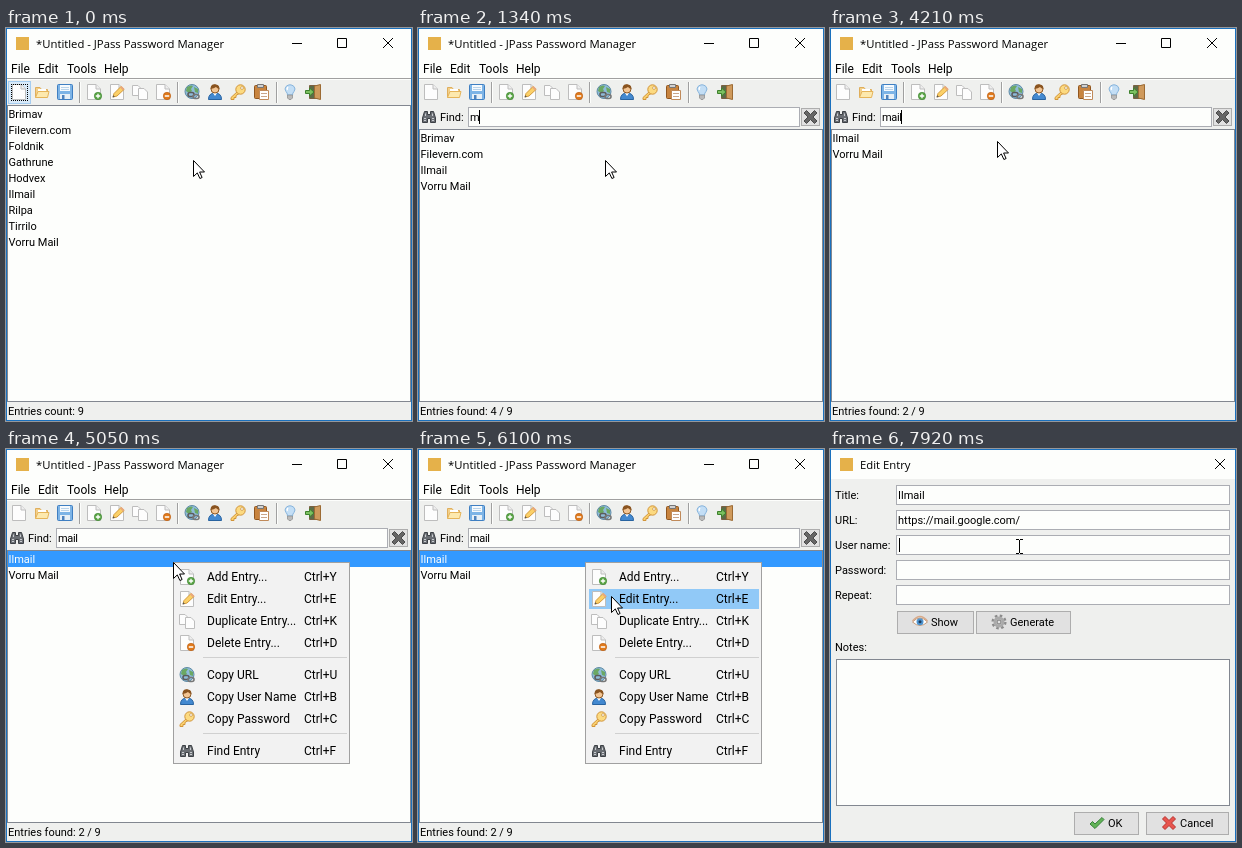
Animation of 406 by 393 pixels, one loop 8 s. Source, as an HTML page:

```html
<!DOCTYPE html>
<html lang="en">
<head>
<meta charset="utf-8">
<title>Password manager</title>
<style>
  html, body { margin: 0; width: 100%; height: 100%; overflow: hidden; background: #fdfefc; }
  svg { display: block; }
  text { font: 11px Roboto, sans-serif; white-space: pre; }
  .menu { font-size: 12px; }
  .title { font: 11.3px "Open Sans", sans-serif; }
  .tight { letter-spacing: -.35px; }
  .crisp { shape-rendering: crispEdges; }
</style>
</head>
<body>
<svg width="406" height="393" viewBox="0 0 406 393">
  <defs>
    <g id="page">
      <path d="M1.5.5H10L14.500 5V15.500H1.500Z" fill="#fdfdfd" stroke="#bdbdbd"/>
      <path d="M10 .5V5H14.500" fill="#eee" stroke="#bdbdbd"/>
    </g>
    <g id="folder">
      <path d="M1.500 13.500V3.500H6L7.500 5.500H13.500V8" fill="#f3d08a" stroke="#dfae5c"/>
      <path d="M4 5H12V9H4Z" fill="#fff"/>
      <path d="M1.500 13.500L4 7.500H15L13.500 13.500Z" fill="#fde9ae" stroke="#e5b45a"/>
    </g>
    <g id="save">
      <rect x=".5" y=".5" width="15" height="15" rx="1" fill="#7db4e6" stroke="#3f7fc2"/>
      <path d="M3 1H13V7H3Z" fill="#f6fafd"/>
      <path d="M4 3.500H12M4 5.500H12" stroke="#b9d3ea"/>
      <path d="M3 10H13V15H3Z" fill="#e8f0f6"/>
      <path d="M5 11H7.500V15H5Z" fill="#4f83bd"/>
    </g>
    <g id="add">
      <use href="#page"/>
      <circle cx="12" cy="12" r="3.700" fill="#5aa545" stroke="#3c832f" stroke-width=".6"/>
      <path d="M9.800 12H14.200M12 9.800V14.200" stroke="#fff" stroke-width="1.300"/>
    </g>
    <g id="delete">
      <use href="#page"/>
      <circle cx="12" cy="12" r="3.700" fill="#e07a1c" stroke="#b9590f" stroke-width=".6"/>
      <path d="M9.800 12H14.200" stroke="#fff" stroke-width="1.500"/>
    </g>
    <g id="edit">
      <use href="#page"/>
      <path d="M4 13L5 9.500 12 2.500 15 5.500 8 12Z" fill="#fbd068" stroke="#d39a3a"/>
      <path d="M11 3.500L12.500 2 15.500 5 14 6.500Z" fill="#e9a87c"/>
      <path d="M3.500 13.500L4.300 11.200 5.900 12.700Z" fill="#555"/>
    </g>
    <g id="copy">
      <path d="M.5 1.500H6L8.500 4V11.500H.5Z" fill="#fdfdfd" stroke="#bdbdbd"/>
      <path d="M6.500 4.500H12L15.500 8V15.500H6.500Z" fill="#fdfdfd" stroke="#bdbdbd"/>
    </g>
    <g id="globe">
      <circle cx="8" cy="7.500" r="7" fill="#8dbbd9" stroke="#5f8ba5"/>
      <path d="M3 3Q7 .5 9 2L7 5 8 7 5 9 2 7ZM10 3L14 5 14 9 11 8Z" fill="#6ba863"/>
      <g fill="none" stroke-width="1.600">
        <rect x="4" y="8.500" width="6" height="4" rx="2" stroke="#5c5c5c"/>
        <rect x="9" y="10.500" width="6" height="4" rx="2" stroke="#777"/>
      </g>
    </g>
    <g id="user">
      <path d="M1.500 15.500Q1.500 9 8 9T14.500 15.500Z" fill="#4389d0" stroke="#2863a0"/>
      <path d="M6 9L8 12 10 9Z" fill="#fff"/>
      <circle cx="8" cy="5" r="4" fill="#f3c593" stroke="#8e5a26"/>
      <path d="M3.500 5Q3.500 0 8 .3T12.500 5Q10 4.500 9 3 7 4.500 3.500 5Z" fill="#8a5420"/>
    </g>
    <g id="key">
      <path d="M8 7L1 13.500V15.500H4V13.500H6V11.500L10 9Z" fill="#fbd270" stroke="#d2953a"/>
      <circle cx="10.500" cy="5.500" r="4.700" fill="#fcda80" stroke="#d2953a"/>
      <circle cx="12" cy="4" r="1.400" fill="#fff" stroke="#b97d28" stroke-width=".6"/>
    </g>
    <g id="clipboard">
      <rect x="1.500" y="1.500" width="12" height="13" rx="1" fill="#c8843f" stroke="#90561f"/>
      <path d="M4.500.5H10.500V3.500H4.500Z" fill="#d0d0d0" stroke="#777"/>
      <path d="M6.500 6.500H15.500V15.500H6.500Z" fill="#fff" stroke="#c08a5a"/>
      <path d="M8 9.500H14M8 12.500H14" stroke="#c9a58a"/>
    </g>
    <g id="bulb">
      <path d="M5.500 11Q5.500 9 4 7.500 2 5 4 2.500 8-1 12 2.500 14 5 12 7.500 10.500 9 10.500 11Z" fill="#c3def5" stroke="#86b4dc"/>
      <path d="M6 3Q4.500 4.500 5.500 6" fill="none" stroke="#fff" stroke-width="1.500"/>
      <path d="M5.500 11H10.500V14L9 15.500H7L5.500 14Z" fill="#bbb" stroke="#888" stroke-width=".7"/>
    </g>
    <g id="exit">
      <path d="M4.500 1.500H15.500V14.500H4.500Z" fill="#5d6b48" stroke="#7a6142"/>
      <path d="M9.500 2L15.500 .5V15.500L9.500 14Z" fill="#cf9a5c" stroke="#9c6b34"/>
      <path d="M.5 6.500H4.500V4L9 8 4.500 12V9.500H.5Z" fill="#7cc061" stroke="#3d812c"/>
    </g>
    <g id="find" fill="#6a6e73" stroke="#3c4045">
      <path d="M3.500 2.500H6.500V5.500H9.500V2.500H12.500L14.500 9V13.500H9.500V9.500H6.500V13.500H1.500V9Z"/>
      <path d="M3 9.500H5M11 9.500H13M4.500 4.500V7M11.500 4.500V7M3 11.500H5M11 11.500H13" stroke="#c9ccd0"/>
    </g>
    <g id="eye">
      <path d="M.5 8Q8 0 15.500 8 8 15 .5 8Z" fill="#fff" stroke="#c49a7a"/>
      <circle cx="8" cy="7.700" r="3.500" fill="#4f95d0"/>
      <circle cx="8" cy="7.700" r="1.500" fill="#1d3a5c"/>
      <path d="M.5 7Q8-2 15.500 7" fill="none" stroke="#d7a988" stroke-width="1.300"/>
    </g>
    <g id="gear" fill="none">
      <circle cx="8" cy="8" r="6.300" stroke="#8b8b8b" stroke-width="2.500" stroke-dasharray="2.500 2.450"/>
      <circle cx="8" cy="8" r="4" fill="#eee" stroke="#aaa" stroke-width="3"/>
      <circle cx="8" cy="8" r="2" fill="#e1e1e1" stroke="#777"/>
    </g>
    <path id="check" d="M1 9L3.500 6.500 6 9 13 2.500 15 4.500 6 13.500Z" fill="#62b357" stroke="#37803a"/>
    <path id="cross" d="M1.500 4L4 1.500 8 5.500 12 1.500 14.500 4 10.500 8 14.500 12 12 14.500 8 10.500 4 14.500 1.500 12 5.500 8Z"/>
    <path id="arrow" d="M.5.500V16.500L4.300 12.900 6.900 18.500 9.100 17.500 6.600 12H11.500Z" fill="#fff" stroke="#000"/>
    <path id="beam" class="crisp" d="M-3-6.500H0M1-6.500H4M.5-6V7M-3 7.500H0M1 7.500H4" fill="none" stroke="#000"/>
  </defs>
  <g id="stage"></g>
</svg>
<script>
const LOOP = 8000, STEP = 70;
const WHITE = '#fdfefc', PANEL = '#eff0ee', EDGE = '#828790', FIELD_EDGE = '#abadb3', SHADOW = '#a0a0a0';
const entries = ['Brimav', 'Filevern.com', 'Foldnik', 'Gathrune', 'Hodvex',
                 'Ilmail', 'Rilpa', 'Tirrilo', 'Vorru Mail'];
const queries = [[2460, 'mail'], [1830, 'mai'], [1620, 'ma'], [1340, 'm'], [0, '']];
// start, end, x, y
const carets = [
  [500, 920, 53, 82], [1340, 1620, 61, 82], [1620, 1830, 67, 82], [1830, 2250, 69, 82],
  [2460, 2880, 71, 82], [3370, 3860, 71, 82], [4210, 4420, 71, 82],
  [6520, 6940, 94, 39], [7430, 7920, 94, 39], [7920, 8000, 69, 89]
];
const tools = [['page', 5], ['folder', 28], ['save', 51], ['add', 80], ['edit', 103], ['copy', 126],
  ['delete', 149], ['globe', 178], ['user', 201], ['key', 224], ['clipboard', 247], ['bulb', 276], ['exit', 299]];
const menuItems = [
  ['add', 'Add Entry...', 'Y', 128], ['edit', 'Edit Entry...', 'E', 150],
  ['copy', 'Duplicate Entry...', 'K', 172], ['delete', 'Delete Entry...', 'D', 194],
  ['globe', 'Copy URL', 'U', 226], ['user', 'Copy User Name', 'B', 248],
  ['key', 'Copy Password', 'C', 270], ['find', 'Find Entry', 'F', 302]
];

const rect = (x, y, w, h, fill) =>
  `<rect class="crisp" x="${x}" y="${y}" width="${w}" height="${h}" fill="${fill}"/>`;
const box = (x, y, w, h, fill, edge) => rect(x, y, w, h, edge) + rect(x + 1, y + 1, w - 2, h - 2, fill);
const text = (x, y, s, cls = '', fill = '#000') => `<text x="${x}" y="${y}" class="${cls}" fill="${fill}">${s}</text>`;
const line = (d, stroke = '#000', extra = '') => `<path d="${d}" fill="none" stroke="${stroke}" ${extra}/>`;
const icon = (id, x, y, extra = '') => `<use href="#${id}" x="${x}" y="${y}" ${extra}/>`;
const dotted = (x, y, w, h) => line(
  `M${x} ${y + .5}h${w}M${x} ${y + h - .5}h${w}M${x + .5} ${y}v${h}M${x + w - .5} ${y}v${h}`,
  '#000', 'class="crisp" stroke-dasharray="1 1"');
const closeMark = x => line(`M${x} 10l10 10m0-10l-10 10`);

// Stepped pointer movement, one position per STEP
function glide(t, start, steps, from, to) {
  const p = Math.max(0, Math.min(steps, Math.floor((t - start) / STEP) + 1)) / steps;
  const eased = p * p * (3 - 2 * p);
  return from.map((v, i) => Math.round(v + (to[i] - v) * eased));
}

function frame(title) {
  return box(0, 0, 406, 393, PANEL, '#1a70bd') + rect(1, 1, 404, 29, WHITE) +
    rect(10, 9, 13, 13, '#e5b14a') + text(30, 20, title, 'title');
}

function toolbar(focused) {
  const groove = (x, y, w, h, dx, dy) => rect(x, y, w, h, SHADOW) + rect(x + dx, y + dy, w, h, WHITE);
  let out = groove(1, 50, 404, 1, 0, 1);
  if (focused) out += box(2, 53, 23, 23, '#d8eaf9', '#a5cdf0');
  out += tools.map(([id, x]) => icon(id, x, 56)).join('');
  out += [73, 171, 270].map(x => groove(x, 54, 1, 21, 1, 0)).join('');
  return out + (focused ? dotted(5, 56, 17, 17) : '');
}

function searchBar(query) {
  return icon('find', 3, 81) + text(22, 93, 'Find:') +
    box(50, 79, 332, 20, WHITE, FIELD_EDGE) + text(52, 93, query, 'tight') +
    box(383, 80, 19, 18, '#e1e1e1', '#adadad') + icon('cross', 384.500, 81, 'fill="#666" stroke="#4a4a4a"');
}

function popup(hover) {
  const rows = menuItems.map(([id, label, key, y], i) =>
    (i === hover ? rect(171, y - 10, 170, 20, '#91c9f7') : '') + icon(id, 173, y - 8) +
    text(201, y + 4, label, 'menu') + text(298, y + 4, 'Ctrl+' + key, 'menu'));
  return box(167, 113, 177, 202, '#f2f2f2', SHADOW) + rows.join('') +
    [208, 284].map(y => rect(197, y, 144, 1, '#d0d0d0')).join('');
}

function mainWindow(t) {
  const searching = t >= 500, selected = t >= 4420, menuOpen = t >= 5050;
  const query = queries.find(q => t >= q[0])[1];
  const found = entries.filter(e => e.toLowerCase().includes(query));
  const top = searching ? 101 : 77;
  let out = frame('*Untitled - JPass Password Manager') +
    line('M286 15.500h10') + line('M331.500 10.500h9v9h-9Z') + closeMark(377) +
    rect(1, 30, 404, 20, WHITE) +
    [['File', 5], ['Edit', 32], ['Tools', 61], ['Help', 98]].map(([s, x]) => text(x, 45, s, 'menu')).join('') +
    toolbar(!searching) + (searching ? searchBar(query) : '') +
    box(1, top, 404, 374 - top, WHITE, EDGE);
  if (selected) out += rect(2, 102, 402, 16, '#3399ff');
  if (selected && !menuOpen) out += dotted(2, 102, 402, 16);
  out += found.map((e, i) =>
    text(2.500, top + 13 + 16 * i, e, '', selected && i === 0 ? WHITE : '#000')).join('');
  out += text(2, 387, query ? `Entries found: ${found.length} / ${entries.length}` : `Entries count: ${entries.length}`);

  let pointer = glide(t, 3650, 7, [187, 132], [167, 113]);
  if (menuOpen) {
    pointer = t >= 6100 ? [193, 147] : glide(t, 5750, 4, [167, 113], [189, 142]);
    out += popup(pointer[1] >= 139 ? 1 : pointer[1] >= 117 ? 0 : -1);
  }
  return [out, icon('arrow', ...pointer)];
}

function button(x, y, w, id, label, labelX, iconX, extra) {
  return box(x, y, w, 23, '#e1e1e1', '#adadad') + icon(id, iconX, y + 3, extra) + text(labelX, y + 15, label);
}

function dialog(t) {
  const fields = [['Title:', 'Ilmail'], ['URL:', 'https://mail.google.com/'], ['User name:', ''], ['Password:', ''], ['Repeat:', '']];
  const out = frame('Edit Entry') + closeMark(385) +
    fields.map(([label, value], i) => text(5, 50 + 25 * i, label) +
      box(66, 36 + 25 * i, 334, 20, WHITE, FIELD_EDGE) +
      text(68, 50 + 25 * i, value)).join('') +
    button(67, 162, 77, 'eye', 'Show', 101, 82) +
    button(146, 162, 95, 'gear', 'Generate', 180, 161) +
    text(5, 202, 'Notes:') + box(6, 210, 394, 147, WHITE, EDGE) +
    button(244, 363, 65, 'check', 'OK', 278, 259) +
    button(316, 363, 83, 'cross', 'Cancel', 350, 331, 'fill="#e8554e" stroke="#b92f2b"');
  const [x, y] = glide(t, 7290, 9, [194, 147], [189, 97]);
  const overField = (y - 36) % 25 < 20;
  return [out, icon(overField ? 'beam' : 'arrow', x, y)];
}

const stage = document.getElementById('stage');
let shown = '';
function render() {
  const t = performance.now() % LOOP;
  const [view, pointer] = t < 6520 ? mainWindow(t) : dialog(t);
  const caret = carets.find(([start, end]) => t >= start && t < end);
  const next = view + (caret ? rect(caret[2], caret[3], 1, 14, '#000') : '') + pointer;
  if (next !== shown) stage.innerHTML = shown = next;
  requestAnimationFrame(render);
}
render();
</script>
</body>
</html>
```
